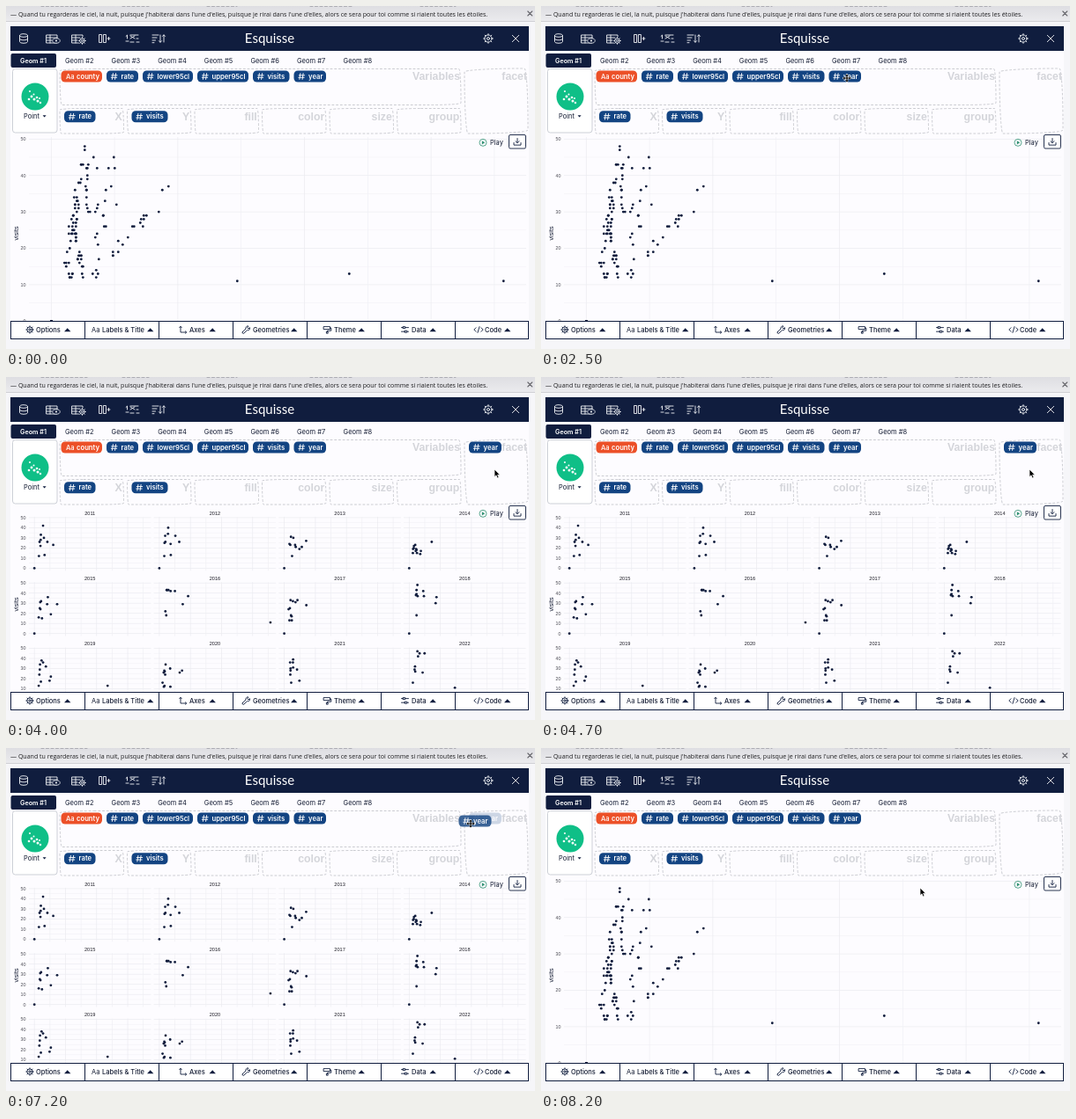
An HTML page for the animation above (8.3 s loop, 600 by 390 pixels).

```html
<!DOCTYPE html>
<html lang="fr">
<head>
<meta charset="utf-8">
<style>
html, body { margin: 0; width: 100%; height: 100%; overflow: hidden; background: #f6f6f9; }
svg { display: block; width: 600px; height: 390px; }
text { font-family: Inter, sans-serif; font-size: 7.5px; fill: #141c33; white-space: pre; }
.drop { font: bold 12.3px "Liberation Sans", Arial, sans-serif; fill: #d4d5da; text-anchor: end; }
.axis { font: 5.4px "Liberation Sans", Arial, sans-serif; fill: #4d4d55; }
.line { fill: none; stroke-width: .9; stroke-linecap: round; stroke-linejoin: round; }
</style>
</head>
<body>
<svg id="stage" viewBox="0 0 600 390" xmlns="http://www.w3.org/2000/svg"></svg>
<script>
const NAVY = '#101d3e', BLUE = '#134482', LOOP = 8300;
const stage = document.getElementById('stage');

const rect = (x, y, w, h, fill, more = '') =>
  `<rect x="${x}" y="${y}" width="${w}" height="${h}" fill="${fill}" ${more}/>`;
const text = (x, y, s, more = '') => `<text x="${x}" y="${y}" ${more}>${s}</text>`;
const line = (d, color, more = '') => `<path class="line" d="${d}" stroke="${color}" ${more}/>`;
const dot = (x, y, r, fill, more = '') => `<circle cx="${x}" cy="${y}" r="${r}" fill="${fill}" ${more}/>`;
const group = (x, y, body, more = '') => `<g transform="translate(${x} ${y})" ${more}>${body}</g>`;

// Sketchy box: long elliptic corners alternate with short ones
function sketchBox(x, y, w, h) {
  const k = Math.min(w, h) / 270, a = 15 * k, b = 255 * k, c = 225 * k;
  const r = x + w, e = y + h;
  return `<path d="M${x + b} ${y}H${r - a}A${a} ${c} 0 0 1 ${r} ${y + c}V${e - a}
    A${c} ${a} 0 0 1 ${r - c} ${e}H${x + a}A${a} ${b} 0 0 1 ${x} ${e - b}V${y + a}A${b} ${a} 0 0 1 ${x + b} ${y}Z"
    fill="none" stroke="#c6c7cc" stroke-width=".9" stroke-dasharray="2.8 1.9"/>`;
}

const hash = (x, y, c) => line(`M${x + 2.4} ${y - 3.4}l-1 6.8M${x + 5.6} ${y - 3.4}l-1 6.8M${x + .8} ${y - 1.2}h6.4M${x + .3} ${y + 1.3}h6.4`, c);

function pill(x, y, w, name, isText) {
  const icon = isText ? text(x + 5.5, y + 2.7, 'Aa', 'style="fill:#fff;font-weight:500"') : hash(x + 5, y, '#fff');
  return rect(x, y - 6.5, w, 13, isText ? '#ec5028' : BLUE, 'rx="4.5"') + icon +
    text(x + (isText ? 17.5 : 16.5), y + 2.7, name, 'style="fill:#fff;font-weight:600;font-size:7.7px"');
}

function gear(x, y, r, c) {
  let teeth = '';
  for (let i = 0; i < 8; i++) {
    const u = Math.cos(i * Math.PI / 4), v = Math.sin(i * Math.PI / 4);
    teeth += `M${x + u * r * .75} ${y + v * r * .75}L${x + u * r} ${y + v * r}`;
  }
  return `<circle class="line" cx="${x}" cy="${y}" r="${r * .75}" stroke="${c}"/>` +
    `<circle class="line" cx="${x}" cy="${y}" r="${r * .28}" stroke="${c}"/>` + line(teeth, c);
}

const table = 'M-6 -4h12v9h-12zM-6 -1h12M-6 2h6M-2 -4v9';

function topBars() {
  let s = rect(0, 0, 600, 17.5, 'url(#bar)') + rect(0, 17, 600, .8, '#c9c9ce') +
    line('M40 .3h52M132 .3h30M228 .3h34M345 .3h48M470 .3h40', '#9a9aa2', 'stroke-dasharray="3 2.5"') +
    text(5, 11.7, "— Quand tu regarderas le ciel, la nuit, puisque j'habiterai dans l'une d'elles, puisque je rirai dans l'une d'elles, alors ce sera pour toi comme si riaient toutes les étoiles.",
      'style="font-family:\'Open Sans\',sans-serif;font-size:7.05px;fill:#1c1c1e"') +
    line('M591.8 6l5 5M596.8 6l-5 5', '#66666c', 'style="stroke-width:1.1"');
  s += rect(5, 23, 588, 355, '#fdfcff') + rect(5, 23, 588, 28, NAVY);
  s += text(299, 42, 'Esquisse', 'text-anchor="middle" style="font-family:Lato,sans-serif;font-size:15px;fill:#fff"');
  const w = '#f2f4f8';
  s += group(20, 37, line('M-4.5 -3.5a4.5 1.8 0 0 1 9 0a4.5 1.8 0 0 1 -9 0v7a4.5 1.8 0 0 0 9 0v-7M-4.5 0a4.5 1.8 0 0 0 9 0', w));
  s += group(52, 37, line(table, w) + `<ellipse cx="5" cy="2.5" rx="4.2" ry="2.7" fill="${NAVY}" stroke="${w}" stroke-width=".8"/>` + dot(5, 2.5, 1.1, w));
  s += group(81, 37, line(table, w) + dot(5.5, 2.5, 4.4, NAVY) + gear(5.5, 2.5, 3.8, w));
  s += group(111, 37, line('M-5 -4.5h2.6v9h-2.6zM-.2 -4.5h2.6v9h-2.6zM4 0h3M5.5 -1.5v3', w));
  s += group(143, 37, line('M-7 -2.5l1.5 -1.5v4M-2 -4h9M-2 0l5 -3M-2 -3l5 3M5 0h2M-7 3h3M-2 4h4M5 4h3', w));
  s += group(173, 37, line('M-7 -4h7M-7 -1h5M-7 2h3.5M-7 4.7h2M2 -4v8M.5 2.7l1.5 1.6l1.5 -1.6M6 4v-8M4.5 -2.6l1.5 -1.6l1.5 1.6', w));
  s += gear(547, 37, 5.4, w) + line('M574.3 33.3l7.4 7.4M581.7 33.3l-7.4 7.4', w);
  s += rect(5.5, 54, 51.5, 16, NAVY, 'rx="2"') +
    text(31, 64.8, 'Geom #1', 'text-anchor="middle" style="fill:#fff;font-weight:600;font-size:7.2px"');
  for (let i = 2; i < 9; i++) s += text(67 + 52.6 * (i - 2), 64.8, 'Geom #' + i);
  return s;
}

function dropZones() {
  let s = rect(7.5, 71.5, 50.5, 72.5, '#fff', 'rx="3" stroke="#c8cbd3" stroke-width=".9"') + dot(33, 103, 15.5, '#0fbf87');
  [[26, 106, 1.3], [27, 97, 1], [29, 103, 1.4], [31.5, 100.5, 1], [32, 106, 1.5], [35, 104, 1.3], [36, 108, 1.5], [39, 110, 1.2], [38, 105, 1]]
    .forEach(p => s += dot(p[0], p[1], p[2], '#fff'));
  s += text(20, 128, 'Point') + `<path d="M41.6 124.2h4l-2 2.3z" fill="${NAVY}"/>`;
  s += sketchBox(61, 71.5, 455, 41) + text(515, 83.5, 'Variables', 'class="drop"');
  s += sketchBox(520, 71, 72, 74) + text(591, 83.5, 'facet', 'class="drop"');
  ['X', 'Y', 'fill', 'color', 'size', 'group'].forEach((name, i) => {
    const x = 61 + 76.5 * i;
    s += sketchBox(x, 116.5, 72.5, 28.5) + text(x + 70.8, 129.5, name, 'class="drop"');
  });
  s += pill(62.5, 80, 46.5, 'county', true) + pill(114, 80, 36, 'rate') + pill(155, 80, 57, 'lower95cl') +
    pill(217, 80, 58, 'upper95cl') + pill(280, 80, 41.5, 'visits') + pill(326.5, 80, 36.5, 'year');
  return s + pill(66, 125.7, 35.5, 'rate') + pill(142.5, 125.7, 41, 'visits');
}

function bottomBar() {
  let s = rect(5.5, 358.5, 587, 20, '#fff', `stroke="${NAVY}"`);
  for (let i = 1; i < 7; i++) s += rect(5 + 84 * i, 358.5, 1, 20, NAVY);
  const item = (x, name, arrow, icon) => {
    s += icon + text(x, 371, name, 'style="font-weight:500"') +
      `<path d="M${arrow} 370.3l3.7 -4l3.7 4z" fill="${NAVY}"/>`;
  };
  const at = (x, d) => group(x, 368, line(d, NAVY));
  item(34, 'Options', 66, gear(27, 368, 4.2, NAVY));
  item(109, 'Labels &amp; Title', 160, text(97, 371, 'Aa'));
  item(208, 'Axes', 230.5, at(201, 'M-3 -3.5v6.5h6.5M-4.2 -2.3l1.2 -1.4l1.2 1.4M2.4 1.8l1.3 1.2l-1.3 1.2'));
  item(280, 'Geometries', 323, at(272, 'M-3.6 2.4l3.6 -3.4a2.4 2.4 0 0 1 3 -3l-1.3 1.7l1.2 1.2l1.6 -1.2a2.4 2.4 0 0 1 -3 3l-3.6 3.4a1 1 0 0 1 -1.5 -1.7z'));
  item(372, 'Theme', 399.5, at(364.5, 'M-4 -3.4h7v3h-7zM3 -2h1.3v3.2h-4.3v1M-.7 2.2h1.4v2h-1.4z'));
  item(460, 'Data', 480.5, at(452.5, 'M-4 -2.4h2M.4 -2.4h3.6M-4 2.2h4M2.5 2.2h1.5M-2 -3.4h2.3v2h-2.3zM0 1.2h2.3v2h-2.3z'));
  item(543, 'Code', 565, at(536, 'M-3 -2.2l-2.2 2.2l2.2 2.2M3 -2.2l2.2 2.2l-2.2 2.2M1 -3.4l-2 6.8'));
  return s;
}

function plotTools() {
  return `<circle cx="541" cy="155.3" r="4" fill="none" stroke="#2f9172" stroke-width=".8"/>` +
    '<path d="M539.8 153.2l3.4 2.1l-3.4 2.1z" fill="#2f9172"/>' + text(549, 158, 'Play') +
    rect(570.5, 146.5, 19, 15.5, '#fff', `rx="1.5" stroke="${NAVY}" stroke-width=".9"`) +
    line('M580 150.5v5M578 153.7l2 2l2 -2M576 155.5v2.6h8v-2.6', NAVY);
}

// Observations per year: x on the full-width plot, then the visit count
const years = [];
const year = (...flat) => {
  const pts = years.length === 5 ? [] : [[51, 0]];
  for (let i = 0; i < flat.length; i += 2) pts.push([flat[i], flat[i + 1]]);
  years.push(pts);
};
year(91, 42, 81, 33, 80, 28, 79, 22, 75, 26, 111, 26, 138, 23, 95, 30, 98, 13, 72, 12);
year(92, 40, 78, 32, 91, 34, 125, 32, 79, 26, 75, 25, 103, 24, 143, 26, 74, 12, 104, 13);
year(82, 31, 75, 24, 93, 30, 132, 21, 104, 21, 121, 19, 152, 27, 87, 12, 79, 23, 101, 23);
year(79, 23, 73, 22, 72, 20, 83, 19, 85, 18, 81, 17, 69, 19, 68, 15, 105, 17, 102, 14, 155, 26, 87, 15);
year(113, 36, 82, 32, 78, 31, 76, 25, 79, 24, 110, 29, 156, 29, 127, 19, 71, 16, 86, 15);
year(85, 43, 87, 43, 93, 43, 103, 42, 123, 42, 184, 37, 159, 29, 79, 22, 83, 18, 564, 11);
year(80, 33, 112, 33, 91, 32, 71, 24, 77, 25, 153, 28, 82, 18, 103, 31, 75, 13, 86, 13, 85, 17);
year(89, 48, 85, 43, 116, 42, 85, 39, 82, 38, 90, 37, 119, 37, 177, 36, 173, 30, 85, 18);
year(84, 38, 91, 36, 77, 34, 104, 32, 76, 29, 74, 24, 81, 17, 127, 22, 121, 18, 71, 13, 389, 13);
year(80, 34, 76, 27, 74, 28, 78, 24, 71, 26, 101, 30, 156, 28, 145, 26, 66, 16, 75, 13, 102, 12, 72, 12);
year(78, 36, 91, 36, 92, 31, 80, 30, 80, 28, 121, 18, 79, 24, 110, 29, 83, 16, 92, 39);
year(89, 47, 99, 45, 122, 45, 92, 42, 78, 32, 76, 29, 79, 27, 113, 26, 68, 16, 262, 11);

// One panel: x0 and y0 place the origin, kx and ky scale the full plot
function panel(pts, x0, y0, kx, ky, r, left, right, top, showY) {
  let s = '';
  const bottom = Math.min(358, y0 + 2.5 * ky);
  for (let v = 0; v <= 50; v += 5) {
    const y = y0 - v * ky;
    if (y > 358.5) continue;
    s += rect(left, y - .35, right - left, .7, v % 10 ? '#f4f3f7' : '#ebebf0');
    if (showY && v % 10 === 0) s += text(22.5, y + 1.8, v, 'class="axis" text-anchor="end"');
  }
  for (let i = 0; i < 8; i++)
    s += rect(x0 + i * 71.8 * kx - .35, top, .7, bottom - top, i % 2 ? '#f0f0f4' : '#ebebf0');
  pts.forEach(p => s += dot((x0 + (p[0] - 51) * kx).toFixed(2), (y0 - p[1] * ky).toFixed(2), r, '#111d3d'));
  return s;
}

function facetPlot() {
  let s = '';
  years.forEach((pts, i) => {
    const col = i % 4, row = i >> 2, x = 32.2 + 141.7 * col, y = 217.4 + 74.3 * row;
    s += panel(pts, x, y, 1 / 4.07, 1.15, 1.4, x - 6.3, x + 132.3, y - 58.5, col === 0);
    s += text(x + 63, y - 60.6, 2011 + i, 'class="axis" text-anchor="middle" style="font-size:5.6px;fill:#1a1a22"');
  });
  return s;
}

const pillYear = id => `<g id="${id}">${pill(-18.5, 0, 37, 'year')}</g>`;

stage.innerHTML =
  `<defs><linearGradient id="bar" x2="0" y2="1"><stop stop-color="#dedee2"/><stop offset="1" stop-color="#ebebee"/></linearGradient>
  <clipPath id="area"><rect x="5" y="147" width="588" height="212"/></clipPath></defs>` +
  rect(0, 0, 600, 390, '#f6f6f9') + topBars() + dropZones() +
  '<g clip-path="url(#area)"><g id="whole">' + panel(years.flat(), 51.3, 358.3, 1, 4.14, 1.4, 26, 590, 149, true) +
  '</g><g id="facets">' + facetPlot() + '</g></g>' +
  text(0, 0, 'visits', `transform="translate(14 258.5) rotate(-90)" text-anchor="middle" style="font:7.2px 'Liberation Sans',Arial,sans-serif"`) +
  plotTools() + bottomBar() + pillYear('placed') + pillYear('dragged') +
  '<path id="arrow" d="M0 0v8.6l2 -1.8l1.4 3.2l1.6 -.7l-1.4 -3.1h2.7z" fill="#000" stroke="#fff" stroke-width=".7"/>' +
  `<g id="grab">${line('M-3.6 0h7.2M0 -3.6v7.2', '#fff', 'style="stroke-width:2.6"')}${line('M-3 0h6M0 -3v6', '#000', 'style="stroke-width:1.2"')}
  <path d="M-4.6 0l2 -1.7v3.4zM4.6 0l-2 -1.7v3.4zM0 -4.6l1.7 2h-3.4zM0 4.6l1.7 -2h-3.4z" fill="#000"/></g>`;

const parts = {};
for (const id of ['whole', 'facets', 'placed', 'dragged', 'arrow', 'grab']) parts[id] = document.getElementById(id);

const show = (id, on) => parts[id].setAttribute('display', on ? 'inline' : 'none');
const move = (id, x, y) => parts[id].setAttribute('transform', `translate(${x.toFixed(2)} ${y.toFixed(2)})`);

// Pointer route: time, x, y
const route = [[500, 432, 190], [1400, 350, 88], [1900, 350, 88], [2300, 347, 82], [2600, 347, 82], [3200, 552, 106],
  [3600, 552, 106], [3900, 554, 105], [5900, 554, 105], [6400, 538, 83], [6900, 538, 83], [7200, 527, 86], [7600, 446, 112],
  [7800, 436, 140], [8100, 430, 159]];

function pointer(t) {
  let a = route[0];
  for (const b of route) {
    if (t < b[0]) {
      const u = Math.max(0, (t - a[0]) / (b[0] - a[0] || 1)), e = u * u * (3 - 2 * u);
      return [a[1] + (b[1] - a[1]) * e, a[2] + (b[2] - a[2]) * e];
    }
    a = b;
  }
  return [a[1], a[2]];
}

function draw(t) {
  const [x, y] = pointer(t);
  const dragIn = t >= 2600 && t < 3600, dragOut = t >= 6900 && t < 7700;
  const holding = (t >= 2300 && t < 3600) || (t >= 6500 && t < 7700);
  const split = t >= 4000 && t < 7900;
  show('whole', !split);
  show('facets', split);
  show('placed', (t >= 3600 && t < 6900) || (dragIn && x > 520) || (dragOut && x > 515));
  parts.placed.setAttribute('opacity', dragIn || dragOut ? .2 : 1);
  move('placed', 543.5, 80);
  show('dragged', dragIn || dragOut);
  parts.dragged.setAttribute('opacity', .82);
  move('dragged', x + (dragIn ? -5.5 : 5), y - (dragIn ? 2 : 3));
  show('arrow', t >= 500 && !holding);
  move('arrow', x, y);
  show('grab', holding);
  move('grab', x, y);
}

function tick() {
  const t = performance.now() % LOOP;
  draw(Math.floor(t / 100) * 100);
  requestAnimationFrame(tick);
}
tick();
</script>
</body>
</html>
```
